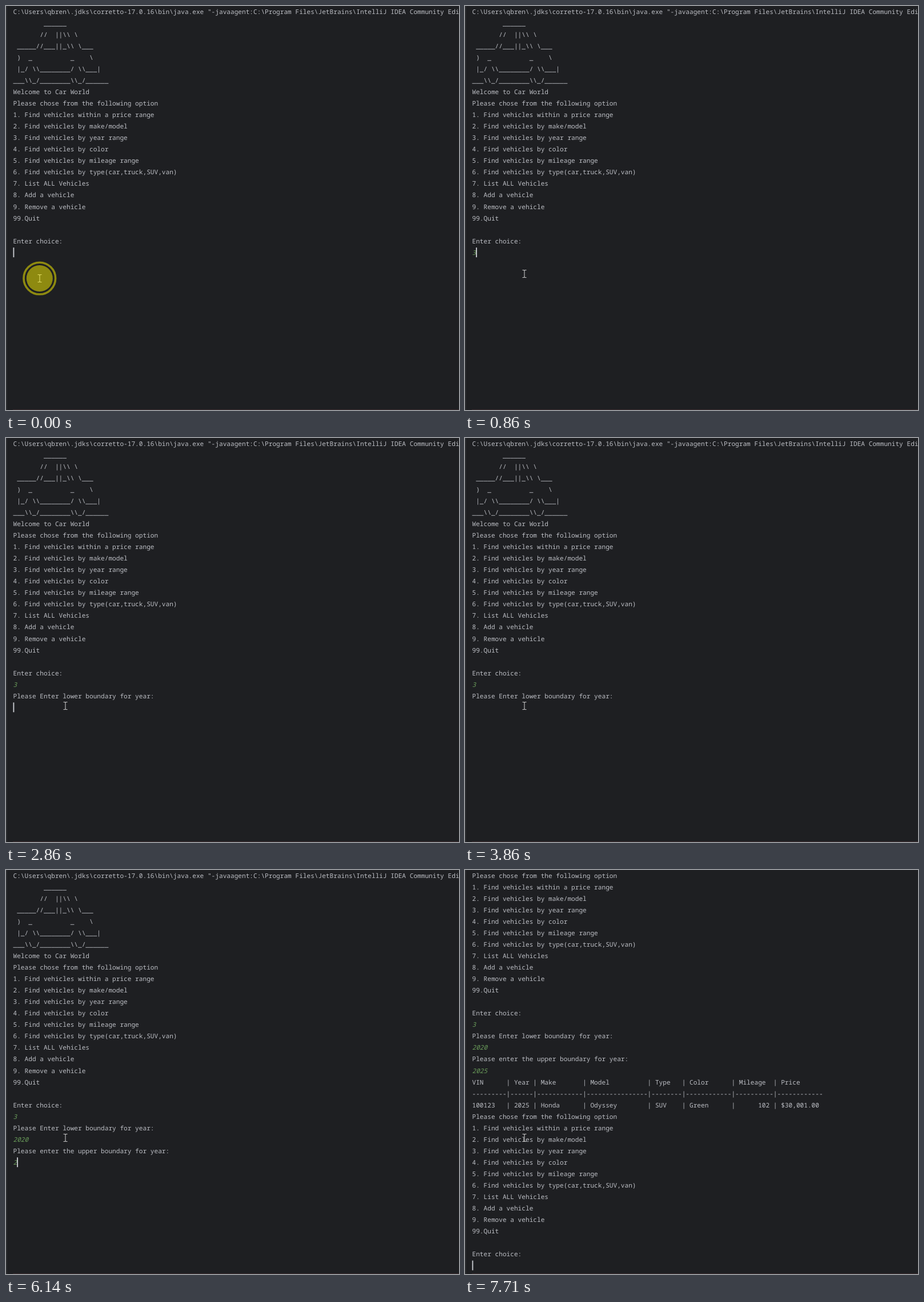
An HTML page that plays this animation: 793 by 706 pixels, repeating every 8000 ms.

```html
<!DOCTYPE html>
<html lang="en">
<head>
<meta charset="utf-8">
<title>Console session</title>
<style>
  html, body { margin: 0; width: 100%; height: 100%; overflow: hidden; background: #1e1f22; }
  svg { display: block; width: 100vw; height: 100vh; }
  text {
    font: 11.13px "Noto Sans Mono", "DejaVu Sans Mono", monospace;
    font-variant-ligatures: none;
    text-rendering: geometricPrecision;
    white-space: pre;
    fill: #bcbec4;
  }
  text.input { font-style: italic; fill: #6a9c5a; }
</style>
</head>
<body>
<svg viewBox="0 0 793 706" preserveAspectRatio="none">
  <rect width="793" height="706" fill="#1e1f22"/>
  <rect width="2" height="706" fill="#2b2d30"/>
  <rect x="12" y="705" width="781" height="1" fill="#3a2c2f"/>
  <g id="console">
    <rect id="caret" width="1.8" height="17" fill="#ced0d6"/>
  </g>
  <path id="pointer" fill="none" stroke="#c4c4c4" stroke-width="1.1"
    d="M-3.5-6.5H-1L0-5.5 1-6.5H3.5M0-5.5V5.5M-3.5 6.5H-1L0 5.5 1 6.5H3.5"/>
  <g id="click" opacity=".5">
    <circle id="disc" r="23" fill="#fef500"/>
    <circle id="ring" fill="none" stroke="#fef500" stroke-width="3.6"/>
  </g>
</svg>
<script>
const LOOP = 8000, LEFT = 12.5, ROW = 20.03, COL = 6.68;
const $ = id => document.getElementById(id);

const banner = String.raw`C:\Users\qbren\.jdks\corretto-17.0.16\bin\java.exe "-javaagent:C:\Program Files\JetBrains\IntelliJ IDEA Community Edi
        ______
       //  ||\\ \
 _____//___||_\\ \___
 )  _          _    \
 |_/ \\________/ \\___|
___\\_/________\\_/______
Welcome to Car World`.split("\n");

const menu = `Please chose from the following option
1. Find vehicles within a price range
2. Find vehicles by make/model
3. Find vehicles by year range
4. Find vehicles by color
5. Find vehicles by mileage range
6. Find vehicles by type(car,truck,SUV,van)
7. List ALL Vehicles
8. Add a vehicle
9. Remove a vehicle
99.Quit

Enter choice:`.split("\n");

const widths = [9, 6, 12, 16, 8, 12, 10, 12];
const tableRow = cells => cells.map((c, i) => ((i ? " " : "") + c).padEnd(widths[i])).join("|");

// Rows from top to bottom: printed text with its time, or typed text with its keystrokes
const print = (at, ...lines) => lines.map(text => ({ steps: [[at, text]] }));
const type = (...steps) => [{ steps, input: true }];
const rows = [
  ...print(0, ...banner, ...menu),
  ...type([710, "3"]),
  ...print(2860, "Please Enter lower boundary for year:"),
  ...type([4570, "20"], [4860, "202"], [5000, "2020"]),
  ...print(5570, "Please enter the upper boundary for year:"),
  ...type([6140, "2"], [6430, "20"], [6570, "202"], [6860, "2025"]),
  ...print(7430,
    tableRow(["VIN", "Year", "Make", "Model", "Type", "Color", "Mileage", "Price"]),
    widths.map(n => "-".repeat(n)).join("|")),
  ...print(7710,
    tableRow(["100123", "2025", "Honda", "Odyssey", "SUV", "Green", "102".padStart(8), "$30,001.00"]),
    ...menu)
];

// [time, row, column]; no row means the caret is blinked off
const caretSteps = [
  [0, 21, 0], [710, 21, 1], [1290], [1710, 21, 1], [2290],
  [2710, 22, 0], [2860, 23, 0], [3860], [4290, 23, 0],
  [4570, 23, 2], [4860, 23, 3], [5000, 23, 4], [5570, 25, 0],
  [6140, 25, 1], [6430, 25, 2], [6570, 25, 3], [6860, 25, 4],
  [7430, 28, 0], [7710, 42, 0]
];
const scrollSteps = [[0, 0], [7710, 8]];
const pointerSteps = [[0, 59, 476], [290, 104, 468]];
// [time, x, y, ring radius, disc shown]
const clickSteps = [
  [0, 58.8, 476, 27.8, 1], [140, 58.8, 476, 24, 0], [290, 58.8, 476, 34.7, 0],
  [430, 103.6, 468.4, 18.7, 0], [860, 0, 0, 0, 0]
];

const current = (steps, t) => steps.findLast(s => s[0] <= t);
const show = (el, on) => el.setAttribute("visibility", on ? "visible" : "hidden");
const move = (el, x, y) => el.setAttribute("transform", `translate(${x} ${y})`);

rows.forEach((row, i) => {
  row.el = document.createElementNS("http://www.w3.org/2000/svg", "text");
  row.el.setAttribute("x", LEFT);
  row.el.setAttribute("y", 14 + i * ROW);
  if (row.input) row.el.setAttribute("class", "input");
  $("console").insertBefore(row.el, $("caret"));
});

function draw(t) {
  for (const row of rows) {
    const step = current(row.steps, t);
    const text = step ? step[1] : "";
    if (row.el.textContent !== text) row.el.textContent = text;
  }
  move($("console"), 0, -current(scrollSteps, t)[1] * ROW);

  const [, line, col] = current(caretSteps, t);
  show($("caret"), line !== undefined);
  if (line !== undefined) move($("caret"), LEFT + col * COL, 1.5 + line * ROW);

  const [, px, py] = current(pointerSteps, t);
  move($("pointer"), px, py);

  const [, cx, cy, radius, pressed] = current(clickSteps, t);
  move($("click"), cx, cy);
  $("ring").setAttribute("r", radius);
  show($("ring"), radius > 0);
  show($("disc"), pressed);
}

function tick() {
  draw(performance.now() % LOOP);
  requestAnimationFrame(tick);
}
tick();
</script>
</body>
</html>
```
